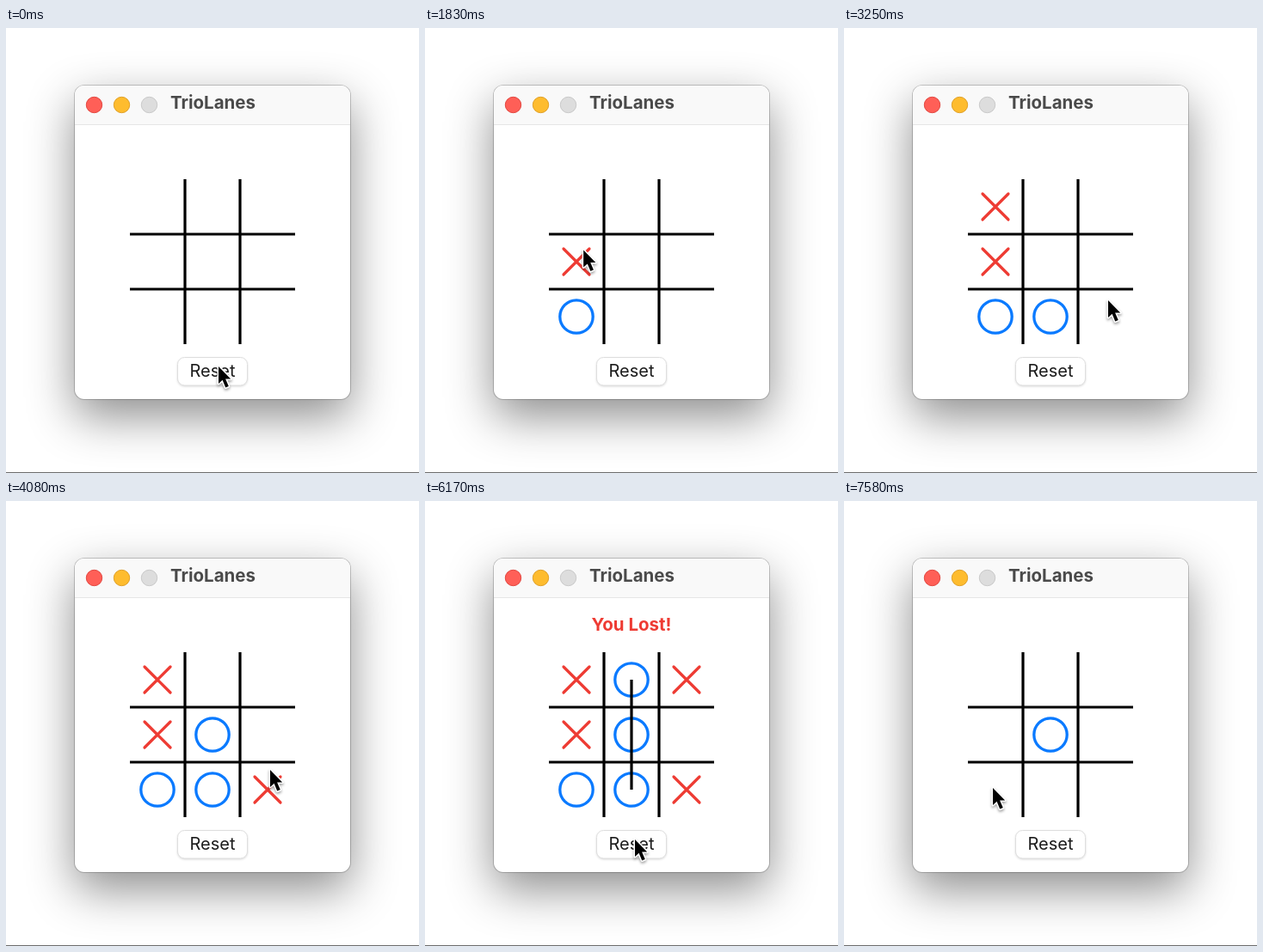
An HTML page that plays this animation: 480x518 px, repeating every 8000 ms.

```html
<!DOCTYPE html>
<html lang="en">
<head>
<meta charset="utf-8">
<title>TrioLanes</title>
<style>
html, body { margin: 0; width: 100%; height: 100%; overflow: hidden; background: #fff; }
.window {
  position: absolute; left: 80px; top: 67px; width: 320px; height: 365px;
  border-radius: 11px; overflow: hidden; background: #fff;
  box-shadow: 0 0 0 1px rgba(0, 0, 0, .2), 0 20px 54px rgba(0, 0, 0, .45);
}
.bar { height: 45px; background: #f9f9f9; border-bottom: 1px solid #e6e6e6; }
.base { position: absolute; left: 0; right: 0; top: 517px; height: 1px; background: #6c6c6c; }
svg { position: absolute; left: 0; top: 0; font-family: Inter, Roboto, sans-serif; }
.button { fill: #fff; stroke: #dedede; filter: drop-shadow(0 1px 1px rgba(0, 0, 0, .14)); }
.button.down { fill: #ececec; }
.lines { stroke: #000; stroke-width: 3.2; fill: none; }
.x { stroke: #ee3b33; stroke-width: 3.2; stroke-linecap: round; }
.o { stroke: #0a7aff; stroke-width: 3.3; fill: none; }
.cursor { filter: drop-shadow(0 2px 1.5px rgba(0, 0, 0, .35)); }
</style>
</head>
<body>
<div class="window"><div class="bar"></div></div>
<div class="base"></div>
<svg width="480" height="518" viewBox="0 0 480 518">
  <circle cx="102.5" cy="89.5" r="9.2" fill="#ff5f57" stroke="#e2463f"/>
  <circle cx="134.5" cy="89.5" r="9.2" fill="#febc2e" stroke="#e0a028"/>
  <circle cx="166.5" cy="89.5" r="9.2" fill="#dddddd" stroke="#c9c9c9"/>
  <text x="191" y="94" font-size="20.5" font-weight="700" fill="#4a4a4a">TrioLanes</text>
  <rect class="button" id="button" x="199.5" y="383.5" width="81" height="32.5" rx="8"/>
  <text x="240" y="406" font-size="20" fill="#1c1c1c" text-anchor="middle">Reset</text>
  <g id="marks"></g>
  <path class="lines" d="M208 176V368M272 176V368M144 240H336M144 304H336"/>
  <g id="result">
    <path class="lines" d="M240 208V336"/>
    <text x="240" y="151" font-size="20.5" font-weight="700" fill="#ee3b33" text-anchor="middle">You Lost!</text>
  </g>
  <circle id="ring" r="36.5" fill="none" stroke="#222" stroke-width="3"/>
  <g class="cursor" id="cursor">
    <path d="M0 0V20L4.6 15.8L8.2 24.5L11.8 23L8.1 14.4H14.2Z"
      stroke="#fff" stroke-width="3" stroke-linejoin="round" paint-order="stroke"/>
  </g>
</svg>
<script>
const LOOP = 8000, STEP = 1000 / 12;
const RESET = 82, LOST = 57;
const RING_STEPS = 2;
const clicks = [15, 28, 41, 55, 78];

// step, x, y
const path = [
  [2, 247, 394], [4, 252, 393], [10, 237, 270], [13, 184, 270],
  [21, 184, 270], [25, 185, 197], [33, 185, 197], [39, 307, 317],
  [48, 307, 317], [49, 307, 313], [53, 306, 226], [64, 306, 226],
  [74, 244, 394], [86, 244, 394], [91, 173, 334]
];

// kind, column, row, first step, last step
const moves = [
  ['x', 0, 1, 17, RESET], ['o', 0, 2, 17, RESET],
  ['x', 0, 0, 30, RESET], ['o', 1, 2, 30, RESET],
  ['x', 2, 2, 43, RESET], ['o', 1, 1, 43, 96],
  ['x', 2, 0, LOST, RESET], ['o', 1, 0, LOST, RESET]
];

const $ = id => document.getElementById(id);
const show = (el, on) => el.setAttribute('visibility', on ? 'visible' : 'hidden');
const place = (el, x, y) => el.setAttribute('transform', `translate(${x} ${y})`);

const shapes = { x: 'M-15-15L15 15M15-15L-15 15', o: 'M-19.2 0a19.2 19.2 0 1 1 38.4 0a19.2 19.2 0 1 1-38.4 0' };
const marks = moves.map(([kind, col, row, from, to]) => {
  const el = document.createElementNS('http://www.w3.org/2000/svg', 'path');
  el.setAttribute('class', kind);
  el.setAttribute('d', shapes[kind]);
  place(el, 176 + col * 64, 208 + row * 64);
  $('marks').append(el);
  return { el, from, to };
});

function cursorAt(n) {
  const i = path.findIndex(p => p[0] >= n);
  if (i < 0) return path[path.length - 1].slice(1);
  if (i === 0) return path[0].slice(1);
  const [a, ax, ay] = path[i - 1], [b, bx, by] = path[i];
  const u = (n - a) / (b - a), e = u * u * (3 - 2 * u);
  return [ax + (bx - ax) * e, ay + (by - ay) * e];
}

function draw(time) {
  const n = Math.floor((time % LOOP + 5) / STEP) % 96;
  const [x, y] = cursorAt(n);
  const click = clicks.find(c => n >= c && n < c + RING_STEPS);
  place($('cursor'), x, y);
  place($('ring'), x, y);
  show($('ring'), click !== undefined);
  $('button').classList.toggle('down', click === 78);
  marks.forEach(m => show(m.el, n >= m.from && n < m.to));
  show($('result'), n >= LOST && n < RESET);
}

const start = performance.now();
function tick() {
  draw(performance.now() - start);
  requestAnimationFrame(tick);
}
tick();
</script>
</body>
</html>
```
